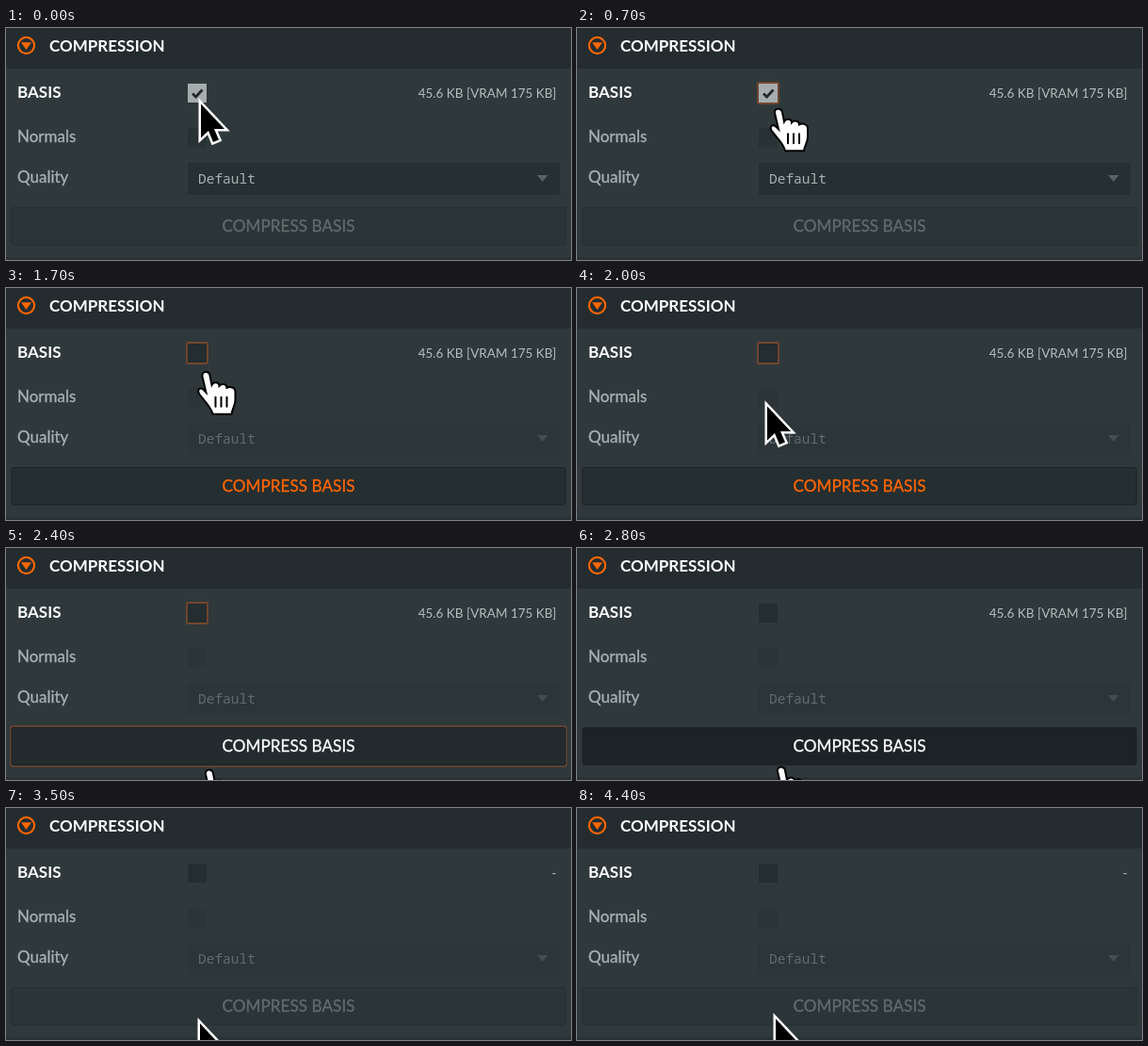
An HTML page for the animation above (4.5 s loop, 600 by 246 pixels).

```html
<!DOCTYPE html>
<html lang="en">
<head>
<meta charset="utf-8">
<style>
  html, body { margin: 0; width: 100%; height: 100%; overflow: hidden; background: #2f393b; }
  svg { display: block; width: 600px; height: 246px; font: 17px Lato, sans-serif; fill: #a9b1b3; }
  .mono { font: 14.5px "Noto Sans Mono", monospace; }
  .medium { stroke: currentColor; stroke-width: .3; }
  .strong { font-weight: 700; fill: #fff; }
  .ring { fill: none; }
</style>
</head>
<body>
<svg viewBox="0 0 600 246">
  <rect width="600" height="246" fill="#2f393b"/>
  <rect width="600" height="43" fill="#242c2f"/>
  <rect y="243" width="600" height="3" fill="#283133"/>

  <circle cx="21.5" cy="18.5" r="8.6" fill="none" stroke="#f60" stroke-width="2.2"/>
  <path d="M16 15.2H27L21.5 23Z" fill="#f60"/>
  <text x="46" y="25" class="strong">COMPRESSION</text>

  <text x="12" y="74" class="strong">BASIS</text>
  <rect id="box" x="193" y="59" width="20" height="20"/>
  <path id="check" d="M198 69.5L201.6 73L208.5 65.5" fill="none" stroke="#232b2e" stroke-width="2.8"/>
  <rect id="boxFocus" x="192" y="58" width="22" height="22" rx="1" fill="none" stroke="#74462f" stroke-width="1.8"/>
  <text id="size" x="584.5" y="73.5" text-anchor="end" font-size="13.5" fill="#b5bcbe"></text>

  <text x="12" y="121" class="medium" color="#a9b1b3">Normals</text>
  <rect id="normals" x="193" y="106.5" width="20" height="20"/>

  <text x="12" y="164" class="medium" color="#a9b1b3">Quality</text>
  <rect id="select" x="193" y="143" width="395" height="34" rx="1"/>
  <text id="option" x="204" y="165" class="mono">Default</text>
  <path id="caret" d="M564 156H575.5L569.7 163Z"/>

  <rect id="buttonFocus" x="5" y="189" width="590" height="42.5" rx="2" fill="none" stroke="#74462f" stroke-width="1.4"/>
  <rect id="button" x="6" y="190.5" width="588" height="39.5" rx="2"/>
  <text id="label" x="300" y="216" text-anchor="middle" class="medium" font-size="17.2">COMPRESS BASIS</text>

  <g id="pointer">
    <g id="ring" class="ring">
      <circle r="89.5" stroke="#c4c8c9" stroke-width="4"/>
      <circle r="89.5" stroke="#111" stroke-width="2"/>
    </g>
    <path id="arrow" transform="translate(3 6.5)" d="M0 0V36L8 28.5L13 40.5L19 38L14 26.5H25Z"
      fill="#000" stroke="#fff" stroke-width="5" stroke-miterlimit="6" paint-order="stroke"/>
    <g id="hand" stroke="#000" stroke-width="2" stroke-linecap="round">
      <path fill="#fff" d="M9 15C8 9 16 9 17 14L19 24C21 20 27 21 27 25C30 22 35 23 35 27C39 25 44 27 44 31V40C44 46 41 48 40 55H20C19 48 11 41 6 34C2 28 8 26 11 30L13 32Z"/>
      <path d="M23 37V47M29 37V47M35 37V47"/>
    </g>
  </g>
</svg>
<script>
const LOOP = 4500, STEP = 100;
const $ = id => document.getElementById(id);
const set = (id, attrs) => {
  for (const name in attrs) $(id).setAttribute(name, attrs[name]);
};
const show = (id, on) => set(id, { visibility: on ? "visible" : "hidden" });

// Pointer path: time, x, y
const path = [
  [0, 204, 74], [200, 204, 74], [500, 203, 77], [800, 200, 74.5], [1600, 200, 74.5],
  [1800, 199, 83], [2000, 199, 119], [2200, 201, 192], [2300, 202, 215], [2400, 203, 225],
  [2600, 204, 222], [2800, 204, 222], [3000, 203, 222], [4300, 203, 222], [4400, 208, 217]
];

// Fill, stroke and text colour
const buttonStyles = {
  disabled: ["#2b3537", "#252e30", "#626b6d"],
  ready: ["#252e30", "#1b2123", "#f60"],
  hover: ["#232b2e", "#1b2123", "#fff"],
  pressed: ["#1c2326", "#1c2326", "#fff"]
};

function pointerAt(t) {
  const i = path.findIndex(key => key[0] >= t);
  if (i < 1) return path[0].slice(1);
  const [t0, x0, y0] = path[i - 1], [t1, x1, y1] = path[i];
  const k = (t - t0) / (t1 - t0);
  return [x0 + (x1 - x0) * k, y0 + (y1 - y0) * k];
}

function buttonState(t) {
  if (t < 1700 || t >= 2900) return "disabled";
  if (t < 2200) return "ready";
  return t < 2800 ? "hover" : "pressed";
}

function draw(t) {
  const within = (from, to) => t >= from && t < to;
  const checked = t < 1600, enabled = t < 1700;

  set("box", { fill: checked ? "#a6adaf" : "#242d2f" });
  show("check", checked);
  show("boxFocus", within(400, 2800));
  $("size").textContent = t < 3000 ? "45.6 KB [VRAM 175 KB]" : "-";

  set("normals", { fill: enabled ? "#283134" : "#2b3437" });
  set("select", { fill: enabled ? "#263032" : "#2c3538" });
  set("option", { fill: enabled ? "#a8b0b2" : "#626b6d" });
  set("caret", { fill: enabled ? "#566365" : "#434e50" });

  const state = buttonState(t);
  const [fill, stroke, color] = buttonStyles[state];
  set("button", { fill, stroke });
  set("label", { fill: color, color });
  show("buttonFocus", state === "hover");

  const hand = within(400, 1900) || within(2200, 2900);
  show("hand", hand);
  show("arrow", !hand);
  show("ring", within(1500, 1600) || within(2700, 2800));
  set("pointer", { transform: `translate(${pointerAt(t)})` });
}

const start = performance.now();
function tick() {
  const t = (performance.now() - start) % LOOP;
  draw(Math.floor(t / STEP) * STEP);
  requestAnimationFrame(tick);
}
tick();
</script>
</body>
</html>
```
